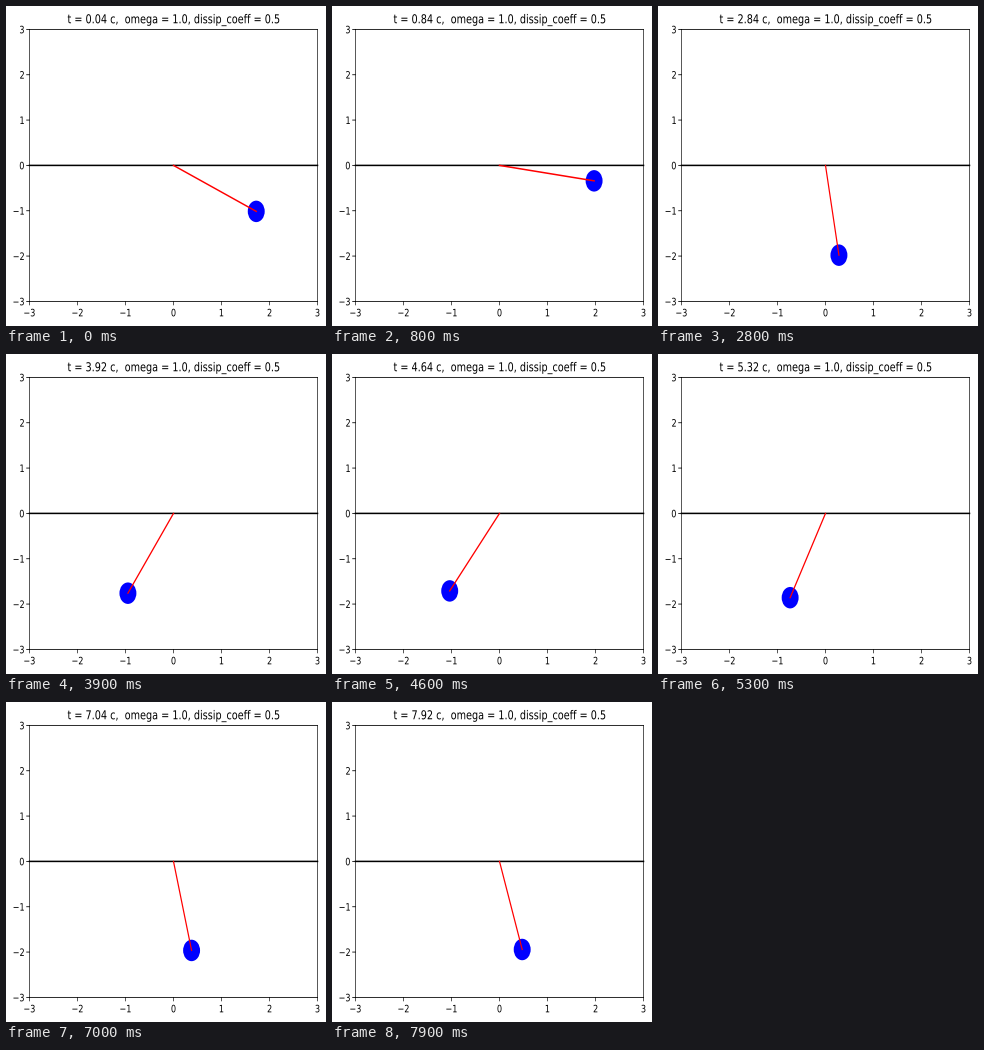
These frames come from a looping animation (320x320 px, 8000 ms). A matplotlib script:

```python
import numpy as np
import matplotlib.pyplot as plt
from matplotlib.animation import FuncAnimation
from matplotlib.patches import Ellipse, PathPatch
from matplotlib.textpath import TextPath
from matplotlib.transforms import Affine2D

plt.rcParams["font.family"] = "DejaVu Sans"

SIZE, DPI = 320, 80
PX = 72 / DPI                      # points per stage pixel
LEFT, RIGHT, TOP, BOTTOM = 23.5, 311.5, 23.4, 295.4
# The plot is a standard 496 x 369.6 px axes squeezed into the square stage
KX, KY = (RIGHT - LEFT) / 496, (BOTTOM - TOP) / 369.6
PT = 100 / 72                      # one point before the squeeze
OMEGA, DAMPING, LENGTH, DT = 1.0, 0.5, 2.0, 0.04
FRAMES, INTERVAL = 80, 100


def px(x):
    return LEFT + (x + 3) / 6 * (RIGHT - LEFT)


def py(y):
    return BOTTOM - (y + 3) / 6 * (BOTTOM - TOP)


def slope(state):
    angle, speed = state
    return np.array([speed, -OMEGA**2 * np.sin(angle) - DAMPING * speed])


def swing(steps):
    """Damped pendulum angles, integrated with RK4."""
    state = np.array([1.0, 1.0])
    angles = [state[0]]
    for _ in range(steps):
        a = slope(state)
        b = slope(state + DT / 2 * a)
        c = slope(state + DT / 2 * b)
        d = slope(state + DT * c)
        state = state + DT / 6 * (a + 2 * b + 2 * c + d)
        angles.append(state[0])
    return angles


def stroke_width(points, dx, dy):
    """Width in points of a stroke seen through the squeeze."""
    return points * PT * np.hypot(dx * KY, dy * KX) / np.hypot(dx, dy) * PX


def stroke(x0, y0, x1, y1, points, color="black", **kw):
    width = stroke_width(points, x1 - x0, y1 - y0)
    line, = ax.plot([x0, x1], [y0, y1], color=color, lw=width, snap=False, **kw)
    return line


def glyphs(text, points, x, baseline, align):
    path = TextPath((0, 0), text, size=points * PT)
    box = path.get_extents()
    anchor = box.x1 if align == "right" else (box.x0 + box.x1) / 2
    place = Affine2D().translate(-anchor, 0).scale(KX, -KY).translate(x, baseline)
    return place.transform_path(path)


def label(*args):
    return ax.add_patch(PathPatch(glyphs(*args), fc="black", lw=0))


fig = plt.figure(figsize=(SIZE / DPI, SIZE / DPI), dpi=DPI, facecolor="white")
ax = fig.add_axes([0, 0, 1, 1])
ax.set_xlim(0, SIZE)
ax.set_ylim(SIZE, 0)
ax.set_autoscale_on(False)
ax.axis("off")

tick = 3.5 * PT
for v in range(-3, 4):
    text = str(v).replace("-", "\u2212")
    stroke(px(v), BOTTOM, px(v), BOTTOM + tick * KY, 0.8)
    stroke(LEFT - tick * KX, py(v), LEFT, py(v), 0.8)
    em = 10 * PT * KY
    label(text, 10, px(v), BOTTOM + 2 * tick * KY + 0.76 * em, "center")
    label(text, 10, LEFT - 2 * tick * KX, py(v) + 0.38 * em, "right")

stroke(LEFT, py(0), RIGHT, py(0), 1.5)
ball = ax.add_patch(Ellipse((0, 0), 21 * PT * KX, 21 * PT * KY,
                            fc="blue", lw=0, zorder=3))
rod = stroke(px(0), py(0), px(0), py(-2), 1.5, "red", zorder=4)
for x in (LEFT, RIGHT):
    stroke(x, TOP, x, BOTTOM, 0.8, zorder=5, solid_capstyle="projecting")
for y in (TOP, BOTTOM):
    stroke(LEFT, y, RIGHT, y, 0.8, zorder=5, solid_capstyle="projecting")
title = label("t", 12, px(0), TOP - 6 * PT * KY, "center")

ANGLES = swing(FRAMES * 5 // 2 + 1)


def draw(i):
    step = i * 5 // 2 + 1
    angle = ANGLES[step]
    x, y = px(LENGTH * np.sin(angle)), py(-LENGTH * np.cos(angle))
    ball.center = x, y
    rod.set_data([px(0), x], [py(0), y])
    rod.set_linewidth(stroke_width(1.5, x - px(0), y - py(0)))
    text = (f"t = {step * DT:.2f} c,  omega = {OMEGA}, "
            f"dissip_coeff = {DAMPING}")
    title.set_path(glyphs(text, 12, px(0), TOP - 6 * PT * KY, "center"))
    return ball, rod, title


anim = FuncAnimation(fig, draw, frames=FRAMES, interval=INTERVAL,
                     repeat=True, repeat_delay=0, blit=False)
plt.show()
```
